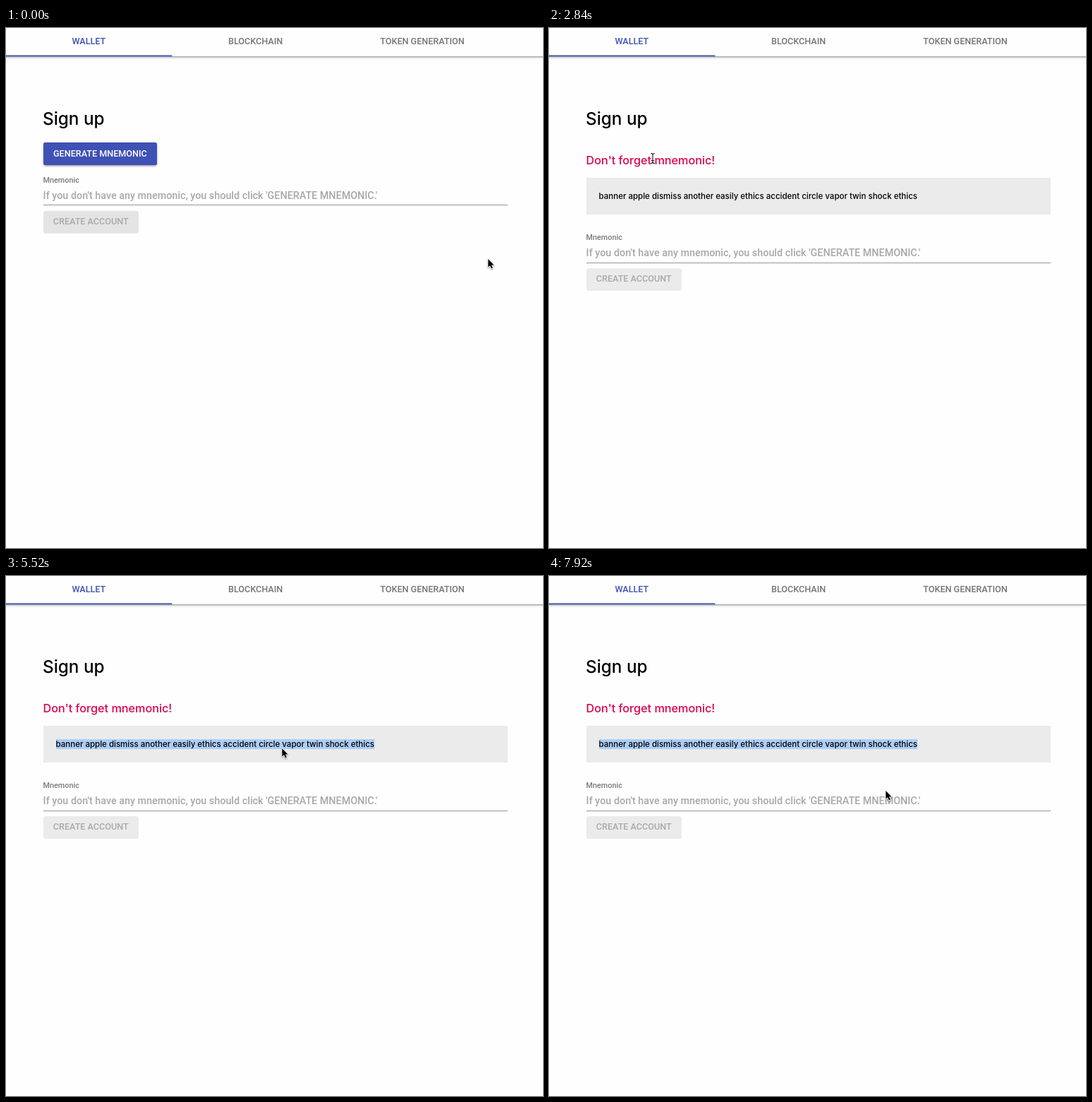
An HTML page with a canvas that plays this animation: 761 by 736 pixels, repeating every 8 s.

```html
<!DOCTYPE html>
<html lang="en">
<head>
<meta charset="utf-8">
<title>Sign up</title>
<style>
  html, body { margin: 0; width: 100%; height: 100%; overflow: hidden; background: #fefefe; }
  canvas { display: block; }
</style>
</head>
<body>
<canvas id="stage" width="761" height="736"></canvas>
<script>
const ctx = document.getElementById('stage').getContext('2d');
const LOOP = 8000;
const PAGE = '#fefefe', BLUE = [63, 81, 181], BLUE_HOVER = [48, 63, 159];
const UI = 'Roboto, sans-serif';
const BODY = 'Inter, sans-serif';
const PHRASE = 'banner apple dismiss another easily ethics accident circle vapor twin shock ethics';
const HINT = "If you don't have any mnemonic, you should click 'GENERATE MNEMONIC.'";

// y offset, blur, spread, opacity
const RAISED = [[1, 4.5, 0, 0.2], [2, 2, 0, 0.14], [3, 1, -2, 0.12]];

const HOVER_AT = 2030, HOVER_MS = 250, REVEAL_AT = 2840;
const DRAG_AT = 4650, SELECT_ALL_AT = 5520;

const linear = p => p;
const easeIn = p => p * (0.5 + 0.5 * p);
const easeOut = p => 1 - (1 - p) * (1 - p);

// Pointer moves: first step, last step, number of steps, end point, easing
const MOVES = [
  [690, 940, 4, 439, 341, linear],
  [1120, 1230, 2, 437, 341, linear],
  [1590, 1590, 1, 427, 333, linear],
  [1675, 1760, 2, 178, 218, linear],
  [1940, 2390, 6, 147, 184, easeOut],
  [3470, 3590, 2, 53, 227, linear],
  [3950, 4210, 4, 62, 234, linear],
  [4390, 4480, 2, 67, 236, linear],
  [4650, 5440, 10, 305, 245, easeIn],
  [5520, 5520, 1, 391, 244, linear],
  [5609, 6320, 9, 525, 240, easeOut],
  [6760, 6760, 1, 527, 240, linear],
  [7570, 7920, 5, 477, 304, linear]
];

function pointerAt(t) {
  let x = 683, y = 327;
  for (const [from, to, steps, endX, endY, ease] of MOVES) {
    if (t < from) break;
    const gap = steps > 1 ? (to - from) / (steps - 1) : 1;
    const done = Math.min(steps, Math.floor((t - from) / gap + 1e-6) + 1);
    const p = ease(done / steps);
    x += (endX - x) * p;
    y += (endY - y) * p;
  }
  return [x, y];
}

function text(str, x, y, font, color, align = 'left') {
  ctx.font = font;
  ctx.fillStyle = color;
  ctx.textAlign = align;
  ctx.fillText(str, x, y);
}

function box(x, y, w, h, color, radius = 0) {
  ctx.fillStyle = color;
  ctx.beginPath();
  ctx.roundRect(x, y, w, h, radius);
  ctx.fill();
}

function raisedBox(x, y, w, h, color, radius = 0) {
  for (const [dy, blur, spread, alpha] of RAISED) {
    ctx.save();
    ctx.shadowColor = `rgba(0,0,0,${alpha})`;
    ctx.shadowOffsetY = dy;
    ctx.shadowBlur = blur;
    box(x - spread, y - spread, w + 2 * spread, h + 2 * spread, color, radius);
    ctx.restore();
  }
  box(x, y, w, h, color, radius);
}

function mix(a, b, p) {
  return `rgb(${a.map((v, i) => Math.round(v + (b[i] - v) * p))})`;
}

function tabs() {
  raisedBox(-20, -20, 801, 60, PAGE);
  const font = `500 12.6px ${UI}`;
  text('WALLET', 117.4, 23, font, '#3f51b5', 'center');
  text('BLOCKCHAIN', 353.6, 23, font, '#757575', 'center');
  text('TOKEN GENERATION', 590, 23, font, '#757575', 'center');
  box(0, 38.4, 235.3, 1.8, '#3f51b5');
}

function generateButton(t) {
  const p = Math.max(0, Math.min(1, (t - HOVER_AT) / HOVER_MS));
  raisedBox(53, 162, 161, 32, mix(BLUE, BLUE_HOVER, p), 3.6);
  text('GENERATE MNEMONIC', 133.4, 182, `500 12.6px ${UI}`, '#fff', 'center');
}

function phraseBox(t, pointerX) {
  text("Don't forget mnemonic!", 52.6, 192.5, `500 16.2px ${BODY}`, '#dc004e');
  box(53, 212, 658, 52, '#ebebeb');
  const font = `500 11.5px ${BODY}`;
  if (t >= DRAG_AT) {
    ctx.font = font;
    const full = ctx.measureText(PHRASE).width;
    const width = t >= SELECT_ALL_AT ? full : Math.min(full, Math.max(0, pointerX - 71));
    box(71, 231, width, 14, '#accef7');
  }
  text(PHRASE, 70.6, 242, font, '#000');
}

function form(dy, buttonColor) {
  text('Mnemonic', 52.6, 219 + dy, `500 10.8px ${UI}`, '#7a7a7a');
  text(HINT, 52.6, 241.6 + dy, `500 14.35px ${UI}`, '#a8a8a8');
  box(53, Math.round(250.4 + dy), 658, 1, '#949494');
  box(53, 258.8 + dy, 135, 32, buttonColor, 3.6);
  text('CREATE ACCOUNT', 120.2, 278 + dy, `500 12.6px ${UI}`, '#aaa', 'center');
}

function arrow(x, y) {
  ctx.save();
  ctx.translate(x + 0.3, y);
  ctx.beginPath();
  [[0, 0], [0, 11.6], [2.6, 9.2], [4.6, 13.6], [6.5, 12.8], [4.6, 8.5], [8.2, 8.4]]
    .forEach(([px, py]) => ctx.lineTo(px, py));
  ctx.closePath();
  ctx.lineJoin = 'round';
  ctx.lineWidth = 1.8;
  ctx.strokeStyle = '#fff';
  ctx.shadowColor = 'rgba(0,0,0,0.4)';
  ctx.shadowOffsetY = 1;
  ctx.shadowBlur = 2;
  ctx.stroke();
  ctx.shadowColor = 'transparent';
  ctx.fillStyle = '#000';
  ctx.fill();
  ctx.restore();
}

function textCursor(x, y) {
  ctx.save();
  ctx.translate(x, y + 0.5);
  ctx.beginPath();
  for (const s of [-1, 1]) {
    ctx.moveTo(-2.8, 7 * s);
    ctx.quadraticCurveTo(0, 7 * s, 0, 5 * s);
    ctx.quadraticCurveTo(0, 7 * s, 2.8, 7 * s);
  }
  ctx.moveTo(0, -6);
  ctx.lineTo(0, 6);
  ctx.moveTo(-2, 3);
  ctx.lineTo(2, 3);
  for (const [color, width] of [['rgba(255,255,255,0.35)', 2.2], ['#111', 1.1]]) {
    ctx.strokeStyle = color;
    ctx.lineWidth = width;
    ctx.stroke();
  }
  ctx.restore();
}

function draw(t) {
  const [x, y] = pointerAt(t);
  ctx.fillStyle = PAGE;
  ctx.fillRect(0, 0, 761, 736);
  tabs();
  text('Sign up', 52, 136.5, `500 24.3px ${BODY}`, '#000');
  if (t < REVEAL_AT) {
    generateButton(t);
    form(0, '#e4e4e4');
  } else {
    phraseBox(t, x);
    form(81.2, '#ebebeb');
  }
  if (y < 194) textCursor(x, y);
  else arrow(x, y);
}

const start = performance.now();
function tick() {
  draw((performance.now() - start) % LOOP);
  requestAnimationFrame(tick);
}
tick();
</script>
</body>
</html>
```
